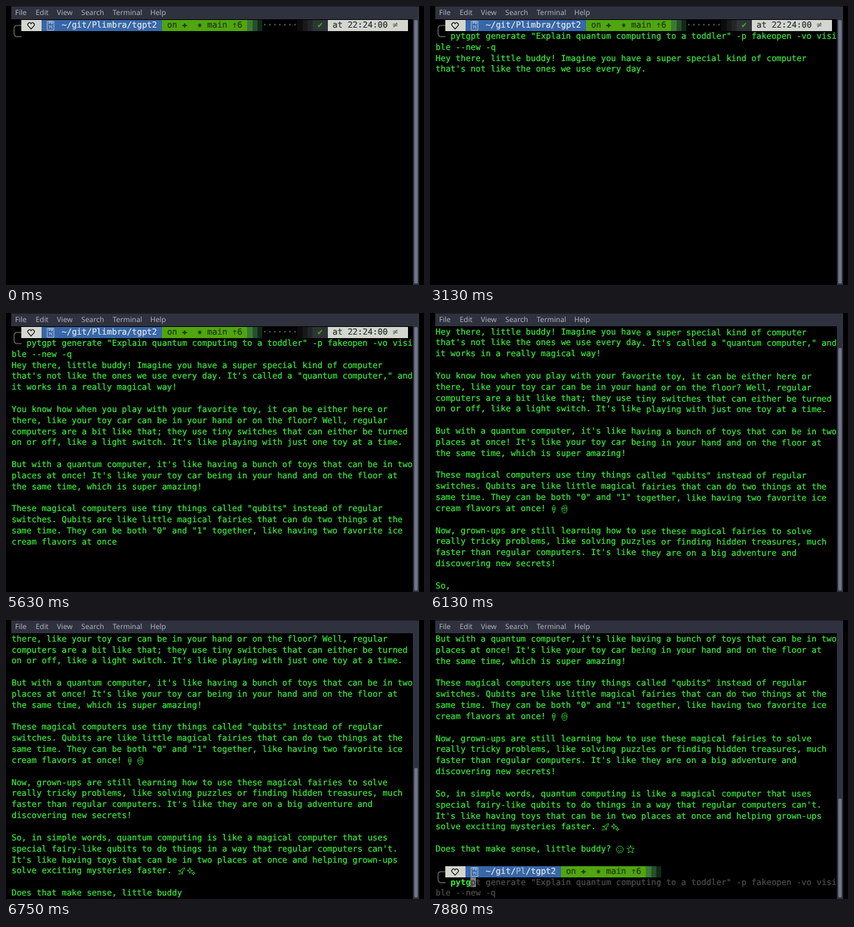
Animation, 600 px wide and 400 px high, one loop 8 s. Source, as an HTML page:

```html
<!DOCTYPE html>
<html lang="en">
<head>
<meta charset="utf-8">
<title>Terminal session</title>
<style>
  html, body { margin: 0; width: 100%; height: 100%; overflow: hidden; background: #000; }
  #stage { position: relative; width: 600px; height: 400px; overflow: hidden; background: #000; }
  #menu {
    position: absolute; left: 7px; top: 0; width: 586px; height: 19px; box-sizing: border-box;
    background: #2f323e; border: solid #191b21; border-width: 1px 0 0 1px;
  }
  #menu span {
    position: absolute; top: -1px; color: #aeb2bd; white-space: pre;
    font: 10.4px/20px "Noto Sans", "Open Sans", sans-serif; text-rendering: geometricPrecision;
  }
  #bar { position: absolute; left: 584px; top: 19px; width: 9px; height: 381px; background: #2f323e; }
  #thumb { position: absolute; left: 2px; width: 5px; border-radius: 2px; background: #6f7486; }
  #view { position: absolute; left: 0; top: 20px; width: 584px; height: 380px; overflow: hidden; }
  #roll { position: absolute; left: 8px; top: 0; }
  #roll div {
    position: absolute; height: 15.84px; white-space: pre; color: #3bec3b;
    font: 11.96px/15.84px "DejaVu Sans Mono", "Noto Sans Mono", monospace;
    text-rendering: geometricPrecision; font-variant-ligatures: none;
    -webkit-text-stroke: 0.22px currentColor;
  }
  #roll .typed { color: #38fb38; font-weight: bold; -webkit-text-stroke: 0; }
  #roll .cursor { color: #2a2a2a; background: #7c7c7c; }
  #roll .ghost { color: #4e4e4e; }
  #roll .dim { color: #a9bcd6; }
  svg { position: absolute; overflow: visible; fill: none; }
</style>
</head>
<body>
<div id="stage">
  <div id="view"><div id="roll"></div></div>
  <div id="menu"></div>
  <div id="bar"><div id="thumb"></div></div>
</div>
<script>
const CW = 7.2, RH = 15.84, ROWS = 24, STEP = 125, LOOP = 8000;
const $ = id => document.getElementById(id);
const roll = $('roll');

const COMMAND = 'pytgpt generate "Explain quantum computing to a toddler" -p fakeopen -vo visible --new -q';
const FIRST = 77;   // characters of the command before it wraps
const TOP = 3;      // line where the answer begins
const ANSWER = `Hey there, little buddy! Imagine you have a super special kind of computer
that's not like the ones we use every day. It's called a "quantum computer," and
it works in a really magical way!

You know how when you play with your favorite toy, it can be either here or
there, like your toy car can be in your hand or on the floor? Well, regular
computers are a bit like that; they use tiny switches that can either be turned
on or off, like a light switch. It's like playing with just one toy at a time.

But with a quantum computer, it's like having a bunch of toys that can be in two
places at once! It's like your toy car being in your hand and on the floor at
the same time, which is super amazing!

These magical computers use tiny things called "qubits" instead of regular
switches. Qubits are like little magical fairies that can do two things at the
same time. They can be both "0" and "1" together, like having two favorite ice
cream flavors at once!

Now, grown-ups are still learning how to use these magical fairies to solve
really tricky problems, like solving puzzles or finding hidden treasures, much
faster than regular computers. It's like they are on a big adventure and
discovering new secrets!

So, in simple words, quantum computing is like a magical computer that uses
special fairy-like qubits to do things in a way that regular computers can't.
It's like having toys that can be in two places at once and helping grown-ups
solve exciting mysteries faster.

Does that make sense, little buddy?`;
const LINES = ANSWER.split('\n');

// Position in the answer just after a given phrase
const after = s => ANSWER.indexOf(s) + s.length;

const STREAM = [
  [22.4, 0], [32, after('on or off, like a')], [36, after('your toy car being')],
  [39, after('your toy car being')], [45, after('flavors at once')],
  [51, after('a way that regular')], [54, after('sense, little buddy')], [55, ANSWER.length]
];
const HISTORY = [[48, 0], [51, 6.2], [54, 24.8], [56, 36], [57, 39], [60, 40]];

function lerp(points, x) {
  if (x <= points[0][0]) return points[0][1];
  for (let i = 1; i < points.length; i++) {
    const [x0, y0] = points[i - 1], [x1, y1] = points[i];
    if (x <= x1) return y0 + (y1 - y0) * (x - x0) / (x1 - x0);
  }
  return points[points.length - 1][1];
}

function put(line, col, text = '', fg, bg, width) {
  const d = document.createElement('div');
  d.textContent = text;
  d.style.left = col * CW + 'px';
  d.style.top = line * RH + 'px';
  if (fg) d.style.color = fg;
  if (bg) d.style.background = bg;
  if (width) d.style.width = width * CW + 'px';
  roll.append(d);
  return d;
}

function draw(line, col, path, stroke, width = 0.9) {
  const box = put(line, col);
  box.innerHTML = `<svg width="15" height="16" stroke="${stroke}" stroke-width="${width}"><path d="${path}"/></svg>`;
  return box;
}

const LIGHT = '#d3d7cf', DARK = '#2e3436', BLUE = '#3867a8', GREEN = '#50a60e';

function prompt(line, dir, shortPart) {
  const parts = [];
  const add = (...a) => { const d = put(line, ...a); parts.push(d); return d; };
  const end = 11 + dir.length;
  parts.push(draw(line, 0, 'M14.4 7.9H8Q3.6 7.9 3.6 12.3V19.4Q3.6 23.8 8 23.8H14.4', '#707070', 1.2));
  add(2, '', '', LIGHT, 4);
  parts.push(draw(line, 3, 'M6 13L1.8 8.4C-.2 5.6 3.8 1.8 6 5.4C8.2 1.8 12.2 5.6 10.2 8.4Z', '#1c1f20', 1.2));
  add(6, '', '', BLUE, end - 6);
  parts.push(draw(line, 7, 'M1.2 2H10.8V14.6H1.2Z', '#c9d3e0', 0.8));
  ['F0', '7C'].forEach((s, i) => {
    const d = add(7.37, s, '#c9d3e0');
    d.style.font = '5.4px/6px "DejaVu Sans Mono", monospace';
    d.style.marginTop = 2.4 + i * 6 + 'px';
  });
  const path = add(10, dir, '#e4e8e8');
  if (shortPart) {
    const [a, b] = dir.split(shortPart);
    path.innerHTML = `${a}<span class="dim">${shortPart}</span>${b}`;
  }
  add(end, '', '', GREEN, 17);
  [[1, 'on'], [4, '✚'], [7, '✷'], [9, 'main'], [14, '⇡6']].forEach(([c, s]) => add(end + c, s, '#20361a'));
  ['#3a7a34', '#25502a', '#11291a'].forEach((c, i) => add(end + 17 + i, '', '', c, 1));
  return parts;
}

function rightPrompt() {
  put(0, 50, '·······', '#6a6a6a');
  ['#0d0b0d', '#19181a', '#242526'].forEach((c, i) => put(0, 57 + i, '', '', c, 1));
  put(0, 60, '', '', DARK, 3);
  put(0, 61, '✔', '#3fae1c');
  put(0, 63, '', '', LIGHT, 16);
  put(0, 64, 'at 22:24:00', DARK);
  put(0, 76, '≠', '#6a6e6c');
}

function commandLine(line) {
  const rows = [put(line, 3), put(line + 1, 0)];
  // count: characters typed; entered: command has been run
  return (count, cursor, entered) => {
    rows.forEach((row, i) => {
      const from = i ? FIRST : 0, to = i ? COMMAND.length + 1 : FIRST;
      const text = count ? COMMAND + ' ' : ' ';
      const span = (a, b, cls) => {
        const s = document.createElement('span');
        s.className = cls;
        s.textContent = text.slice(Math.max(a, from), Math.max(from, Math.min(b, to)));
        return s;
      };
      if (entered) row.textContent = COMMAND.slice(from, to);
      else row.replaceChildren(
        span(0, count, 'typed'),
        span(count, count + 1, cursor ? 'cursor' : 'ghost'),
        span(count + 1, 999, 'ghost'));
    });
  };
}

[['File', 13], ['Edit', 42.5], ['View', 73], ['Search', 108], ['Terminal', 153], ['Help', 207]].forEach(([s, x]) => {
  const e = document.createElement('span');
  e.textContent = s;
  e.style.left = x - 8 + 'px';
  $('menu').append(e);
});

prompt(0, '~/git/Plimbra/tgpt2');
rightPrompt();
const firstCommand = commandLine(1);
const output = LINES.map((_, i) => put(TOP + i, 0));
const nextPrompt = prompt(33, '~/git/Pl/tgpt2', 'Pl');
const nextCommand = commandLine(34);

// Small outline pictures that follow some lines
const ICONS = [
  ['once!\n\nNow', 19, 23, 'M1.6 8Q.6 5 3.6 2Q7 5 5.8 8ZM2 8L3.7 13.5L5.5 8M2 6H5.4'],
  ['once!\n\nNow', 19, 25, 'M1 7H9L8 11Q7 13.5 5 13.5Q3 13.5 2 11ZM1.6 7Q1 3 4.5 3Q5 1.6 7 2.4Q9.6 4 8.4 7M4 5H7M3 9.5H7'],
  ['faster.\n\nDoes', 29, 33, 'M10.5 3Q6.5 3 4 8L6 10Q10.5 7 10.5 3ZM4.6 6.5L1.5 7L4 8.5M7.5 9L7 12.5L5.5 10M1 13L3.5 10M3 13.5L4.6 11M7 6.5H8.4'],
  ['faster.\n\nDoes', 29, 35, 'M4 3L5 6L8 7L5 8L4 11L3 8L0 7L3 6ZM9 8.5L9.7 10.3L11.5 11L9.7 11.7L9 13.5L8.3 11.7L6.5 11L8.3 10.3Z'],
  [null, 31, 36, 'M.6 8A4.9 4.9 0 1 0 10.4 8A4.9 4.9 0 1 0 .6 8M2.8 7Q3.6 5.6 4.5 7M6.5 7Q7.4 5.6 8.2 7M3 9.4Q5.5 12.2 8 9.4'],
  [null, 31, 38, 'M6 2.5L7.4 6.2L11.3 6.4L8.3 8.8L9.4 13L6 10.7L2.6 13L3.7 8.8L.7 6.4L4.6 6.2ZM2 2.5L3.2 4M10 2.5L8.8 4']
].map(([key, line, col, path]) => ({
  at: key ? ANSWER.indexOf(key) + key.indexOf('\n') : ANSWER.length,
  el: draw(line, col, path, '#3bec3b', 0.8)
}));

const show = (el, on) => { el.style.visibility = on ? 'visible' : 'hidden'; };

// Answer so far, never ending inside a word
function streamed(k) {
  const n = Math.round(lerp(STREAM, k));
  const text = ANSWER.slice(0, n);
  return /\w/.test(ANSWER[n] || '') ? text.replace(/\w+$/, '') : text;
}

function render(k) {
  const typed = k < 8 ? 0 : k < 18 ? Math.round(1 + (k - 8) * 10 / 7) : COMMAND.length;
  firstCommand(typed, k >= 4, k >= 20);

  const text = streamed(k), lines = text.split('\n');
  output.forEach((el, i) => { el.textContent = lines[i] || ''; });
  ICONS.forEach(icon => show(icon.el, text.length >= icon.at));

  const back = k >= 57, retyped = Math.max(0, k - 59);
  nextPrompt.forEach(el => show(el, back));
  nextCommand(retyped, back, false);

  const last = retyped ? 35 : back ? 34 : TOP + text.trimEnd().split('\n').length - 1;
  // The tiny turn stops the browser from snapping rows to whole pixels
  roll.style.transform = `translateY(${-Math.max(0, last - ROWS + 1) * RH}px) rotate(0.004deg)`;

  const hist = lerp(HISTORY, k), top = 378 * hist / (hist + ROWS);
  $('thumb').style.top = top + 1 + 'px';
  $('thumb').style.height = 378 - top + 'px';
}

let shown = -1;
function tick() {
  const k = Math.floor(performance.now() % LOOP / STEP);
  if (k !== shown) render(shown = k);
  requestAnimationFrame(tick);
}
tick();
</script>
</body>
</html>
```
